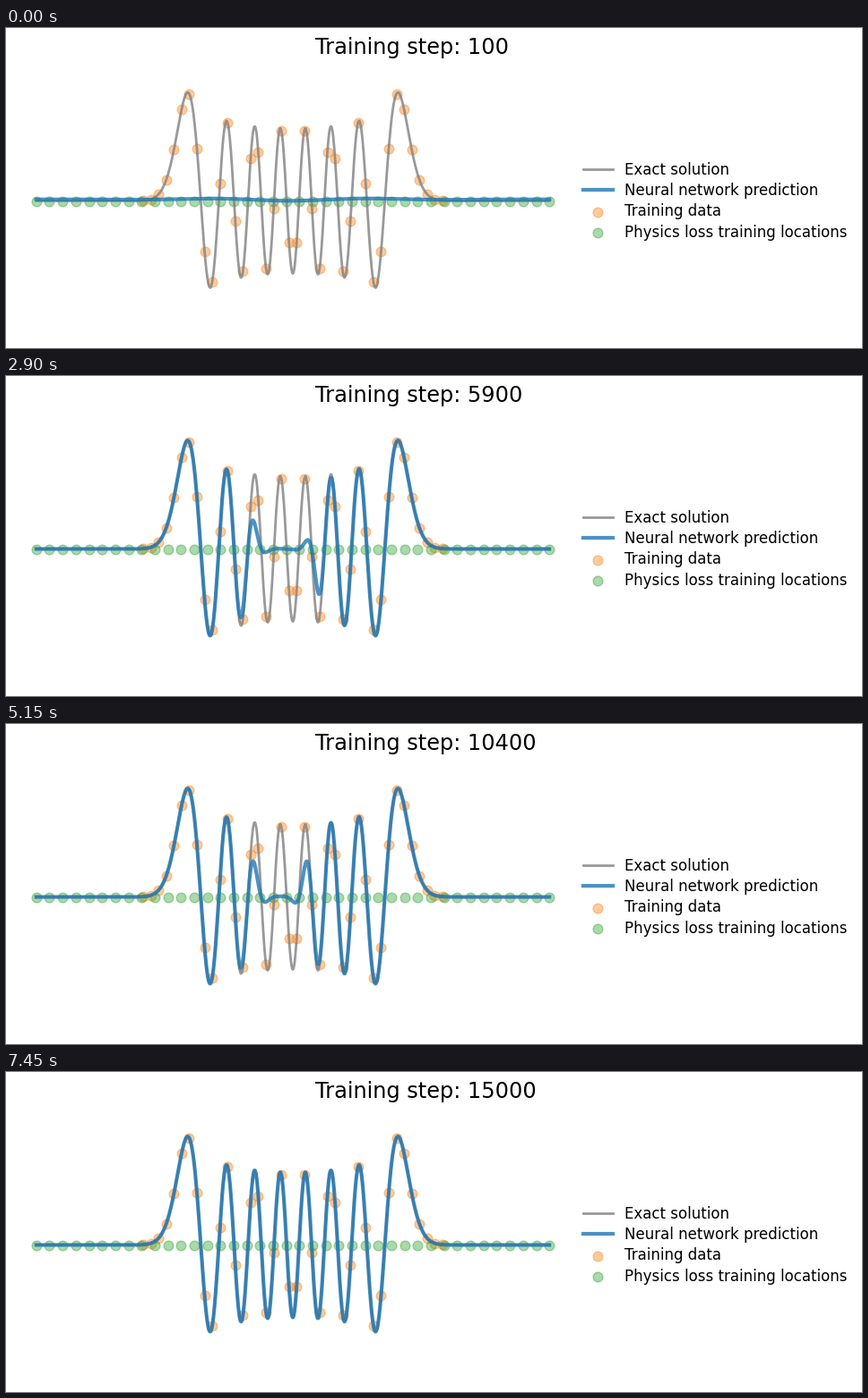
Animation, 955 px wide and 358 px high, one loop 7.5 s. Source, as a matplotlib script:

```python
import numpy as np
import matplotlib.pyplot as plt
from matplotlib.animation import FuncAnimation

W, H, DPI = 955, 358, 100
FRAMES, INTERVAL = 150, 50
CX, BASE = 320.0, 193.5        # centre and zero line of the wave
UNIT, AMP = 23.85, 236.0       # pixels per unit of x and of psi
FAR_L, FAR_R = 120, 520        # learning fronts before anything is learned
SOFT = 5.5                     # width of a front
BLUE, ORANGE, GREEN = "tab:blue", "tab:orange", "tab:green"

plt.rcParams["font.family"] = "DejaVu Sans"


def oscillator(px, n=14):
    """Harmonic oscillator eigenstate n, as height in pixels."""
    x = (np.asarray(px, float) - CX) / UNIT
    a, b = np.zeros_like(x), np.pi ** -0.25 * np.exp(-x * x / 2)
    for k in range(n):
        a, b = b, np.sqrt(2 / (k + 1)) * x * b - np.sqrt(k / (k + 1)) * a
    return AMP * b


def step(x, at, width):
    return 1 / (1 + np.exp((at - x) / width))


def bump(x, at, width):
    return np.exp(-((x - at) / width) ** 2)


def surge(x, at):
    """Sudden rise with a slow decay to the right."""
    return step(x, at, 4) * np.exp((at - x) / 85)


X = np.linspace(CX - 12 * UNIT, CX + 12 * UNIT, 1000)
EXACT = oscillator(X)

# Smooth guesses of the untrained and of the collapsed network
RIPPLE = 1.7 + 1.5 * np.cos((X - 410) / 30) * bump(X, CX, 150)
LIFT = 2.5 + 4 * step(X, 185, 12) + 2.2 * step(X, 410, 15)
RELAPSE = (12 * surge(X, 158) + 19 * surge(X, 423)
           + 5 * bump(X, 305, 40) - 4 * bump(X, 374, 8))

# Frame, left front, right front: inward, collapse, inward again until they meet
FRONTS = np.array([(19, FAR_L, FAR_R), (32, 240, 400), (38, 268, 374),
                   (66, 276, 335), (69, FAR_L, FAR_R), (76, FAR_L, FAR_R),
                   (90, 262, 378), (103, 276, 335), (122, 275.5, 329),
                   (149, 335, 305)]).T


def prediction(k):
    left, right = (np.interp(k, FRONTS[0], row) for row in FRONTS[1:])
    known = np.minimum(1, 1 - step(X, left, SOFT) + step(X, right, SOFT))
    ripple = np.interp(k, [0, 17], [1, 0]) * (1 + 6 * bump(k, 8, 3))
    lift = np.interp(k, [0, 17, 38], [0, 1, 0])
    relapse = np.interp(k, [66, 69, 74, 88], [0, 1, 1, 0])
    guess = ripple * RIPPLE + lift * LIFT + relapse * RELAPSE
    inside = step(X, left, SOFT) - step(X, right, SOFT)
    asleep = max(lift, relapse, ripple > 0) * (left == FAR_L)
    return BASE - known * EXACT * (1 - asleep) - guess * max(asleep, 0) \
        - guess * np.clip(inside, 0, 1) * (1 - asleep)


fig = plt.figure(figsize=(W / DPI, H / DPI), dpi=DPI, facecolor="white")
ax = fig.add_axes([0, 0, 1, 1])
ax.set_xlim(0, W)
ax.set_ylim(H, 0)
ax.axis("off")


def line(x, y, color, lw):
    return ax.plot(x, y, color=color, lw=lw, alpha=0.8)[0]


def dots(x, y, color):
    ax.scatter(x, y, s=60, color=color, alpha=0.4)


line(X, BASE - EXACT, "grey", 2)
curve = line(X, prediction(0), BLUE, 3)
data_x = CX + UNIT * np.linspace(-7, 7, 40)
dots(data_x, BASE - oscillator(data_x), ORANGE)
dots(np.linspace(X[0], X[-1], 40), np.full(40, BASE), GREEN)

# Legend
labels = ["Exact solution", "Neural network prediction", "Training data",
          "Physics loss training locations"]
rows = 163.7 + 23.4 * np.arange(4)
for label, y in zip(labels, rows):
    ax.text(690, y, label, fontsize=11.95, color="black")
for y, color, lw in zip(rows, ("grey", BLUE), (2, 3)):
    line([643.5, 676.8], [y - 6, y - 6], color, lw)
for y, color in zip(rows[2:], (ORANGE, GREEN)):
    dots([660.2], [y - 4.7], color)

title = ax.text(345, 28.7, "", fontsize=17.28, color="black")


def update(k):
    curve.set_ydata(prediction(k))
    title.set_text(f"Training step: {100 * (k + 1)}")
    return curve, title


anim = FuncAnimation(fig, update, frames=FRAMES, interval=INTERVAL,
                     repeat=True, repeat_delay=0, blit=False)
plt.show()
```
